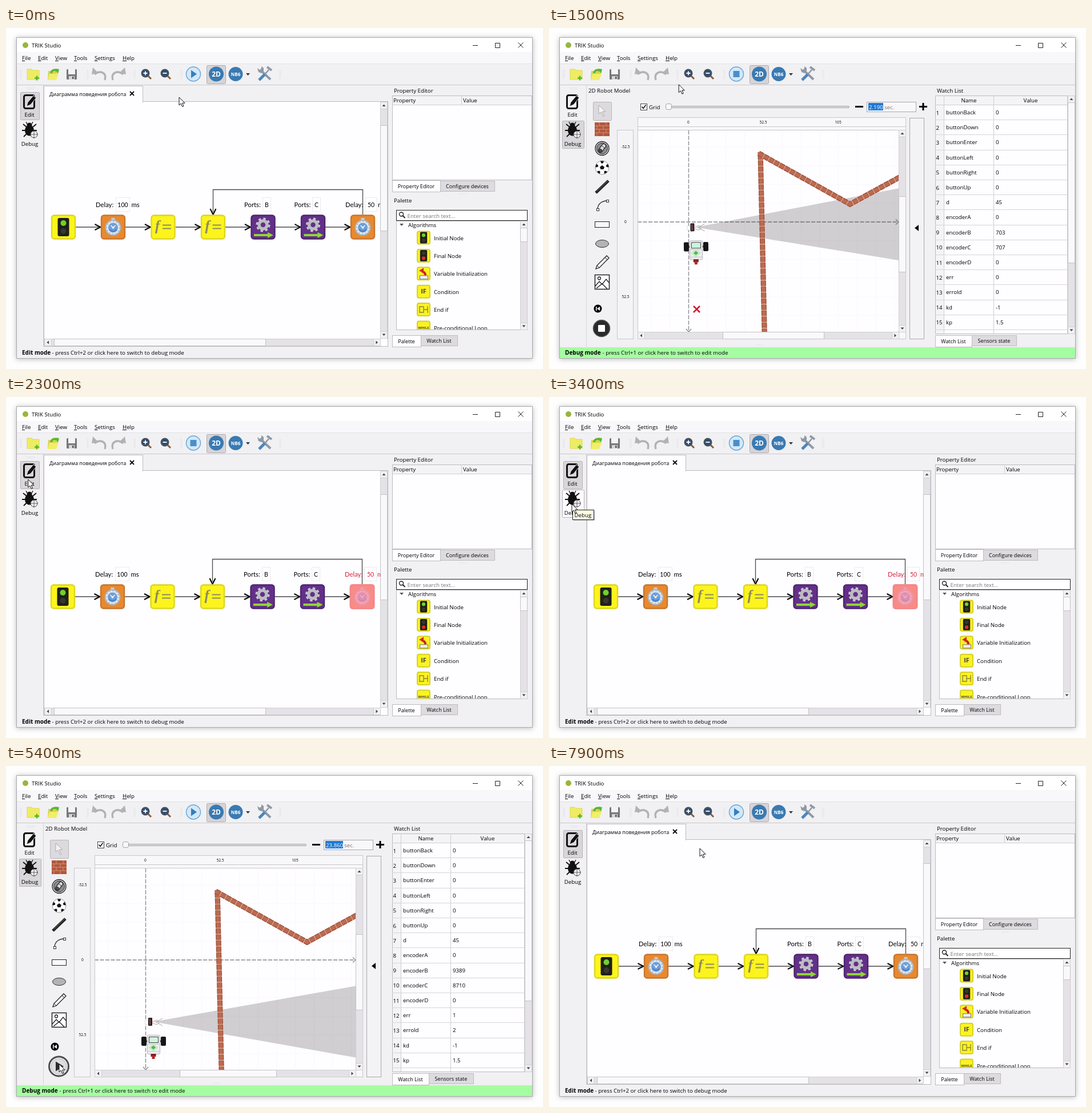
These frames come from a looping animation (940 px wide and 596 px high, 8000 ms). An HTML page:

```html
<!DOCTYPE html>
<html lang="en">
<head>
<meta charset="utf-8">
<title>Robot studio</title>
<style>
html, body { margin: 0; width: 100%; height: 100%; overflow: hidden; background: #fefefe; }
svg { display: block; width: 100%; height: 100%; }
text { font: 9.7px "Open Sans", sans-serif; fill: #000; white-space: pre; }
.b { font-weight: 700; }
.mode { font-size: 10px; }
.mid { text-anchor: middle; }
.tiny { font-size: 6.6px; text-anchor: middle; }
.tab { font-size: 9.1px; }
.lab text { font: 11.3px Lato, sans-serif; }
.lab .num { font-size: 10.5px; }
.fn { font: italic bold 25px "Liberation Serif", serif; fill: #8d8a62; }
.w { fill: #fff; }
.gray { fill: #777; }
.hot text { fill: #d8203c; }
.win { filter: drop-shadow(0 1px 5px #0004); }
</style>
</head>
<body>
<svg id="stage" viewBox="0 0 940 596"></svg>
<script>
const BG = '#f1f0f3', PAPER = '#fefdff', EDGE = '#bdbbc0';
const LOOP = 8000;

// markup helpers
const rect = (x, y, w, h, fill, stroke, more = '') => {
  const o = stroke ? .5 : 0;
  return `<rect x="${x + o}" y="${y + o}" width="${w}" height="${h}" fill="${fill}" stroke="${stroke || 'none'}" ${more}/>`;
};
const text = (x, y, s, cls = '', more = '') => `<text x="${x}" y="${y}" class="${cls}" ${more}>${s}</text>`;
const fill = (d, c, more = '') => `<path d="${d}" fill="${c}" ${more}/>`;
const line = (d, c, w = 1, more = '') => `<path d="${d}" fill="none" stroke="${c}" stroke-width="${w}" ${more}/>`;
const disc = (x, y, r, f, stroke = 'none', w = 1, more = '') =>
  `<circle cx="${x}" cy="${y}" r="${r}" fill="${f}" stroke="${stroke}" stroke-width="${w}" ${more}/>`;
const group = (body, more = '') => `<g ${more}>${body}</g>`;
const at = (x, y, body) => group(body, `transform="translate(${x} ${y})"`);
const clip = (id, x, y, w, h) => `<clipPath id="${id}">${rect(x, y, w, h, '#000')}</clipPath>`;
const range = (n, f) => Array.from({ length: n }, (_, i) => f(i)).join('');

const tri = (x, y, turn) => at(x, y, fill('M-3 1.5L0-2 3 1.5z', '#444', `transform="rotate(${turn})"`));
const vbar = (x, y, h, ty, th) => rect(x, y, 12, h, '#e4e2e6', '#d0ced2') + rect(x, y, 12, 12, BG, '#d0ced2') +
  rect(x, y + h - 12, 12, 12, BG, '#d0ced2') + rect(x, ty, 12, th, '#f9f8fa', '#c4c2c6') +
  tri(x + 6.5, y + 6.5, 0) + tri(x + 6.5, y + h - 6, 180);
const hbar = (x, y, w, tx, tw, id) => rect(x, y, w, 12, '#e4e2e6', '#d0ced2') + rect(x, y, 12, 12, BG, '#d0ced2') +
  rect(x + w - 12, y, 12, 12, BG, '#d0ced2') + rect(tx, y, tw, 12, '#f9f8fa', '#c4c2c6', `id="${id}"`) +
  tri(x + 6.5, y + 6.5, -90) + tri(x + w - 6, y + 6.5, 90);
const tab = (x, y, w, h, s, on) => rect(x, y, w, h, on ? PAPER : '#dddbdf', EDGE) + text(x + w / 2, y + h / 2 + 4, s, 'mid tab');
const dots = (x, y, w, h) => line(w ? `M${x} ${y}h${w}` : `M${x} ${y}v${h}`, '#cfcdd2', 1, 'stroke-dasharray="1 2"');

// window frame, menu and toolbar
function toolbar() {
  const zoom = (x, plus) => line(`M${x + 4} 83l6 6`, '#8a5f3a', 3) + disc(x, 79, 6.5, '#2f5078', '#4b4f55', 2) +
    line(`M${x - 3.5} 79h7` + (plus ? `M${x} 75.5v7` : ''), '#fff', 1.8);
  const undo = line('M173 91c4-13-8-18-18-10', '#b3b1b5', 3.5) + fill('M150 81l2-12 10 10z', '#b3b1b5');
  return [25, 142, 224, 306, 479].map(x => dots(x, 73, 0, 16) + dots(x + 2, 74.5, 0, 14)).join('') +
    fill('M37 72h8l2 2h11v16h-21z', '#eeec62', 'stroke="#dcd85a"') + line('M54 83.5v8M50 87.5h8', '#51b52e', 2.4) +
    fill('M74 75h14l2 2-3 14h-14z', '#d9d24b') + fill('M76 80h16l-4 11h-15z', '#f1ee68') +
    line('M79 79c1-6 6-7 10-4', '#58b534', 3.5) + fill('M86 71l7 1-2 8z', '#58b534') +
    rect(106, 72, 18, 18, '#77777c', '', 'rx="1.5"') + rect(109, 72, 12, 9, '#f4f4f6') + rect(110, 84, 10, 6, '#d4d4d8') +
    rect(116, 85, 2.5, 4, '#555') + undo + group(undo, 'transform="translate(360 0) scale(-1 1)"') +
    zoom(244, true) + zoom(278, false) +
    rect(311, 65, 33, 32, '#dcdade', '#b8b6ba', 'id="runHover" rx="2"') +
    disc(328, 80.5, 12.5, '#d3e8f9', '#62a5d8', 1.4) +
    fill('M324 73.5l10 7-10 7z', '#357fbd', 'id="runIcon"') + rect(322.5, 75, 11, 11, '#4a8fca', '', 'id="haltIcon"') +
    rect(351, 65, 33, 32, '#d6d4d8', '#aeacb0', 'rx="2"') + disc(368, 80.5, 13, '#3a7ab2') +
    text(368, 84.8, '2D', 'b mid w', 'style="font-size:12px"') +
    disc(402, 80.5, 12.5, '#3a7ab2') + text(402, 83.5, 'NB6', 'b mid w', 'style="font-size:8px"') + fill('M420 79h7l-3.5 4z', '#333') +
    line('M446 74l17 16', '#8d99a6', 4) + fill('M440 70l4 3 3-2 0-4 4 3 0 5-4 4-5-2z', '#8d99a6') +
    line('M443 91l10-10', '#4a86bd', 5) + line('M453 81l7-8', '#8d99a6', 2.5) + line('M457 68l8 6', '#8d99a6', 4);
}
function frame() {
  const menu = [['File', 28], ['Edit', 56], ['View', 86], ['Tools', 119], ['Settings', 155], ['Help', 204]];
  const bug = line('M30 168l6 5M53 168l-6 5M28 179h26M31 190l5-5M52 190l-5-5', '#111', 1.8) +
    `<ellipse cx="41" cy="179" rx="8" ry="9.5" fill="#111"/>` + disc(41, 170, 4.5, '#111') + line('M37 168l-2-4M45 168l2-4', '#111', 1.3) +
    disc(49, 186, 6, '#efeef1', '#444') + line('M42 186h14M49 179v14', '#444', .8);
  return rect(18, 16, 903, 561, BG, '#a9a7ac', 'class="win"') + rect(19, 17, 902, 25, '#fff') + rect(19, 42, 902, 20, '#f8f7fa') +
    disc(34, 30, 5, '#98b63c') + text(45, 34, 'TRIK Studio') +
    line('M817 30.5h9M856.5 26.5h8v8h-8zM896.5 25.5l9 9m0-9l-9 9', '#222') +
    menu.map(([s, x]) => text(x, 56, `<tspan text-decoration="underline">${s[0]}</tspan>${s.slice(1)}`)).join('') +
    line('M19 62.5h902', '#e3e1e5') + line('M19 99.5h902', '#c9c7cc') + toolbar() +
    line('M65.5 100v457', '#d5d3d8') + dots(37, 104.5, 14) + dots(38, 107, 12) +
    rect(25, 112, 33, 48, '#d8d6da', '#b5b3b8', 'id="editBox" rx="1"') + rect(23, 162, 38, 48, '#d8d6da', '#b5b3b8', 'id="debugBox" rx="1"') +
    rect(31, 117, 18, 23, 'none', '#111', 'rx="3" stroke-width="3"') +
    fill('M36 137l2-7 10-12 5 4-10 12z', '#111', 'stroke="#efeef1"') + text(41, 155, 'Edit', 'mid') + bug + text(41.5, 206, 'Debug', 'mid') +
    rect(19, 558, 902, 19, BG, '', 'id="bar"') + text(28, 571, '', 'b mode', 'id="modeName"') + text(80, 571, '', '', 'id="modeHint"');
}

// block diagram
const tile = (c, edge) => rect(-20.5, -20.5, 41, 41, c, '', `rx="4.5" style="stroke:${edge};stroke-width:2.4"`);
const clock = tile('#e8892f', '#c6762f') + rect(-3, -16, 6, 4, '#c5ced8') + disc(0, 1, 13, '#dfe6ee', '#a9b4c2', 2) +
  disc(0, 1, 11, 'none', '#7d8ba0', 1.6, 'stroke-dasharray="1 4.76"') + disc(0, 1, 8.5, '#6f9fd8') +
  line('M-6 4a7 7 0 0 0 12 0', '#4f86cc', 3) + line('M-4-3L0 1l4-4', '#f2f6fb', 1.6) + disc(0, 1, 1.8, '#f2f6fb');
const func = tile('#fcf41c', '#dcd61f') + text(-14, 6, 'f', 'fn') + line('M-1-3.5h15M-1 2.5h15', '#8d8a62', 2);
const motor = tile('#633089', '#4e2670') + disc(0, -4, 10.5, 'none', '#c9c9cf', 4, 'stroke-dasharray="4.2 4.047"') +
  disc(0, -4, 7, '#633089', '#bcbcc3', 5.5) + line('M-16 14h25', '#8fd634', 4) + fill('M8 9l10 5-10 5z', '#8fd634');
const lamp = (dot, y) => rect(-10, -16, 20, 32, '#20201b', '', 'rx="3"') + disc(0, -7, 5, '#37372d') + disc(0, 7, 5, '#37372d') + disc(0, y, 5, dot);
const start = tile('#fcf41c', '#dcd61f') + lamp('#6fd12c', -7);

function diagram() {
  const xs = [100.5, 187.5, 275, 362.5, 450, 537.5, 624.5], icons = [start, clock, func, func, motor, motor, clock];
  const box = (x, w, s) => rect(x, 296, w, 24, '#fff', '#d6d4d9', 'stroke-dasharray="1 1"') + text(x + w / 2 + .5, 313, s, 'num mid');
  const link = xs.slice(1).map(x => line(`M${x - 66} 348H${x - 22}`, '#4a4a4a', 1.3) + line(`M${x - 32} 343l10 5-10 5`, '#000', 2)).join('');
  const hot = group(text(594, 313, 'Delay:') + box(628, 21, '50') + text(651, 313, 'ms'), 'id="lastLabel"');
  return group(group(
    line('M624.5 326V282.5H362.5V322', '#4a4a4a', 1.3) + line('M357.5 316l5 10 5-10', '#000', 2) + link +
    xs.map((x, i) => at(x, 348, icons[i])).join('') + rect(602.5, 326, 44, 44, '#ff8ca4', '', 'id="hotTile" rx="4.5" opacity=".75"') +
    group(text(157, 313, 'Delay:') + box(192, 24, '100') + text(219.5, 313, 'ms') + text(417, 313, 'Ports:') + box(449, 14, 'B') +
      text(504.5, 313, 'Ports:') + box(536, 14, 'C') + hot, 'class="lab"'), 'id="diagram"'), 'clip-path="url(#sheet)"');
}
function palette() {
  const arrow = rect(-7, 3, 14, 6, '#eee', '#777') + line('M3 3c0-5-3-6-6-7', '#c22', 4) + fill('M-8-5l8-5 0 9z', '#d02828');
  const small = s => group(s, 'transform="scale(.62)"');
  const word = (s, z) => text(0, z / 3, s, 'b mid', `style="font-size:${z}px;fill:#444"`);
  const merge = line('M-7-6v12M-7-5h7v10h-7M0 0h7M7-6v12', '#99933a', 1.6);
  const rows = [['Initial Node', small(lamp('#6fd12c', -7))], ['Final Node', small(lamp('#e02a2a', 7))], ['Variable Initialization', arrow],
    ['Condition', word('IF', 11)], ['End if', merge], ['Pre-conditional Loop', word('WHILE', 6)]];
  return group(rows.map(([s, icon], i) => at(731, 366.5 + i * 31.4,
    rect(-11, -11, 22, 22, '#fbf320', '', 'rx="3" style="stroke:#d6d02a;stroke-width:2"') + icon + text(18, 4, s))).join(''), 'clip-path="url(#tree)"');
}
function editView() {
  return rect(66, 128, 602, 428, PAPER, EDGE) + rect(66, 101, 173, 28, PAPER, EDGE) + rect(67, 127, 172, 4, PAPER) +
    text(76, 118.5, 'Диаграмма поведения робота', 'tab') + line('M217 111l7 7m0-7l-7 7', '#111', 2) +
    diagram() + vbar(655, 129, 413, 170, 184) + hbar(67, 543, 588, 84, 370, 'sheetThumb') +
    text(679, 113, 'Property Editor') + rect(676, 118, 244, 147, PAPER, EDGE) + rect(677, 119, 243, 15, '#f4f3f6') + line('M676 134.5h244M797.5 118v16', '#cfcdd2') +
    text(678, 130, 'Property') + text(800, 130, 'Value') +
    tab(760, 267, 95, 18, 'Configure devices') + tab(676, 266, 84, 20, 'Property Editor', true) + dots(792, 290, 14) + text(679, 305, 'Palette') +
    rect(683, 318, 229, 18, '#fff', '#222') + disc(692, 325.5, 3.5, 'none', '#222', 1.4) + line('M694.5 328l4 4', '#222', 2) + text(702.5, 331.5, 'Enter search text...', 'gray') +
    rect(683, 337, 229, 190, PAPER, EDGE) + fill('M689 342h7l-3.5 4z', '#555') + text(704, 348, 'Algorithms') + palette() + vbar(900, 337, 190, 349, 24) +
    tab(726, 537, 64, 18, 'Watch List') + tab(676, 537, 50, 20, 'Palette', true);
}

// 2D model
const names = ['buttonBack', 'buttonDown', 'buttonEnter', 'buttonLeft', 'buttonRight', 'buttonUp', 'd', 'encoderA', 'encoderB',
  'encoderC', 'encoderD', 'err', 'errold', 'kd', 'kp'];
const rowY = i => 147.5 + 26.2 * i;

function watch() {
  return text(679, 113, 'Watch List') + rect(676, 118, 244, 416, PAPER, EDGE) + rect(677, 119, 231, 15, '#f4f3f6') +
    rect(677, 134, 14, 400, '#f4f3f6') + rect(692, 135, 86, 25, '#f0f6fd', '#cfe0f3', 'id="picked"') +
    line('M676 134.5h232M691.5 118v416M778.5 118v416M907.5 118v416', '#cfcdd2') +
    text(735, 130, 'Name', 'mid') + text(843, 130, 'Value', 'mid') +
    names.map((n, i) => line(`M676 ${Math.round(rowY(i) + 12.6) + .5}h231`, '#d6d4d9') + text(677.5, rowY(i) + 4, i + 1) +
      text(695, rowY(i) + 3.5, n) + text(782, rowY(i) + 3.5, '0', '', `id="v${i}"`)).join('') + vbar(908, 118, 416, 130, 280) +
    tab(740, 537, 78, 18, 'Sensors state') + tab(676, 537, 64, 20, 'Watch List', true);
}
const tools = () =>
  rect(77, 129, 32, 32, '#dcdade', '#b8b6ba', 'rx="1"') + fill('M87 135v15l4-3 4 8 2-1-4-8h6z', '#f4f3f6', 'stroke="#aaa"') +
  rect(80, 165, 26, 24, '#b2573c') + line('M80 171h26M80 177h26M80 183h26M88 165v6M100 165v6M84 171v6M95 171v6M88 177v6M100 177v6M84 183v6M95 183v6', '#d69a80', .9) +
  disc(93, 210.5, 12, '#d8d8dc', '#222', 1.3) + disc(93, 210.5, 9.5, '#8c8c92', '#222') + line('M90 214l6-8', '#222', 8, 'stroke-linecap="round"') +
  line('M90 214l6-8', '#ddd', 5.5, 'stroke-linecap="round"') + disc(90, 214, 2.5, '#555', '#222') + line('M93 206l4 4', '#222') +
  disc(93, 244, 12, '#fff', '#999') + range(5, i => group(fill('M90 232.5h6l-1 3-2 1.5-2-1.5z', '#111'), `transform="rotate(${i * 72} 93 244)"`)) + fill('M93 240l4 3-1.500 4h-5l-1.500-4z', '#111') +
  line('M82 288l22-21', '#222', 5) + line('M84 285l19-18', '#6b7a60') +
  line('M85 317c0-10 8-15 17-15', '#333', 1.4) + rect(83, 315, 4, 4, '#fff', '#333') + rect(100, 300, 4, 4, '#fff', '#333') +
  rect(80, 338, 25, 10, '#f8f7fa', '#222') + `<ellipse cx="93" cy="377" rx="11.5" ry="6.5" fill="#b4b2b6" stroke="#333"/>` +
  fill('M82 421l2-6 17-17 4 4-17 17z', '#f3f2f5', 'stroke="#222" stroke-width="1.3"') + line('M84 415l4 4M98 401l4 4', '#222') +
  rect(80, 431, 25, 25, '#fff', '#222', 'stroke-width="1.5"') + line('M81 451l7-8 5 5 7-9 5 6M83 455l10-8 9 9', '#222', 1.4) + disc(88, 437.5, 2.5, '#fff', '#222', 1.3) +
  disc(85.5, 490.5, 7, '#000') + fill('M89 487v7l-5-3.5zM82 487h1.5v7h-1.5z', '#fff') +
  group(disc(92, 525, 14.5, '#2a2a2c', '#555', 1.5) + rect(86, 519, 12, 12, '#fff', '', 'rx="1"'), 'id="stopBtn"') +
  group(disc(92.5, 525, 17, '#f1f1f3', '#4c4c50', 3) + disc(92.5, 525, 13.5, '#dddde0', '#b9b9be') + fill('M87 516.5l14 8.5-14 8.5z', '#2c2c30'), 'id="goBtn"');

const brick = d => line(d, '#dfb09c', 9) + line(d, '#8f4632', 9, 'stroke-dasharray="9 1.5"') + line(d, '#bd6a50', 7, 'stroke-dasharray="8.5 2"');
const ray = group(fill('M0-44L640-157V69z', '#1a101c', 'opacity=".2"'), 'id="rayPose"');
const robot = group(
  rect(-15, -47, 5, 7, '#fff', '#ddd') + rect(-9, -51, 7, 14, '#2a2428', '', 'rx="1"') + rect(-7, -49, 2, 10, '#944') +
  line('M-2-44l8-3 4 3M-2-42l8 3 4-3M4-43l12-7M4-44l12 7', '#aaa', 1) +
  line('M-14-10h28', '#555', 3) + rect(-21, -18, 9, 16, '#161616', '', 'rx="2"') + rect(13, -18, 9, 16, '#161616', '', 'rx="2"') +
  rect(-11, -21, 22, 33, '#eeedf0', '#b6b4b9', 'rx="2"') + rect(-8, -18, 16, 10, '#cdf5dc', '#444') + line('M-10-5h21M-10 8h21', '#c4c2c8') +
  fill('M0-6l9 7-9 7-9-7z', '#c5ebc4') + fill('M0-2.500l4 3.500-4 3.500-4-3.500z', '#4fb552') +
  rect(-4.5, 12, 9, 5, '#7a1f22') + rect(-2.5, 15, 5, 6, '#b3262b'), 'id="pose"');

function debugView() {
  const grid = range(15, i => `M${179 + i * 32.75} 179v352`) + range(11, i => `M155 ${208 + i * 32.75}h457`);
  return text(69, 113, '2D Robot Model') + tools() +
    rect(160, 132, 11, 11, '#fff', '#444') + line('M162.5 137.5l2.5 3 4.5-6', '#111', 1.6) + text(175, 141.5, 'Grid') +
    rect(204, 136, 321, 3, '#d9d7db', '#aaa8ad', 'rx="1.5"') + rect(204, 132, 10, 10, '#f8f7fa', '#9f9da2', 'rx="3"') +
    line('M536 137.5h14M648 137.5h14M655 131v13', '#000', 3) + rect(556, 129, 86, 17, '#f8f7fa', '#aaa8ad') +
    rect(559, 131, 26, 13, '#1e78d0', '', 'id="selBox"') + text(560, 141.5, '', 'w', 'id="clock"') + text(587, 141.5, 'sec.', 'gray', 'id="unit"') +
    rect(155, 156, 469, 387, '#f8f7fa', '#c9c7cc') + rect(119, 178, 28, 365, '#f4f3f6', '#c9c7cc') + line('M155 172.5h469', '#c9c7cc') +
    [['0', 244], ['52.5', 375], ['105', 506]].map(([s, x]) => text(x, 166.5, s, 'tiny')).join('') +
    [['-52.5', 207], ['0', 338], ['52.5', 469]].map(([s, y]) => text(134, y + 2.5, s, 'tiny')).join('') +
    rect(155, 178, 457, 353, PAPER, '#c9c7cc') +
    group(line(grid, '#f9f7fb') + line('M244.5 179v352M155 339h457', '#88868b', 1.3, 'stroke-dasharray="7 2.5"') +
      line('M240 526l4.5 5 4.5-5M607 334.5l5 4.5-5 4.5', '#88868b', 1.3) + ray +
      brick('M377.5 545L370 217') + brick('M367 219L527 308L650 241') + line('M253 486l11 11m0-11l-11 11', '#d4142a', 2.6) + robot, 'clip-path="url(#field)"') +
    vbar(612, 178, 353, 294, 132) + hbar(155, 531, 457, 304, 177, 'fieldThumb') +
    rect(631, 157, 25, 386, '#f3f2f5', '#aaa8ad') + fill('M647 344v11l-7-5.5z', '#000') + dots(362, 554, 14) + watch();
}

stage.innerHTML = `<defs>${clip('sheet', 67, 129, 588, 413)}${clip('tree', 684, 338, 216, 189)}${clip('field', 156, 179, 456, 352)}</defs>` +
  frame() + group(editView(), 'id="editView"') + group(debugView(), 'id="debugView"') +
  group(rect(43, 199, 37, 17, '#0003') + rect(41, 197, 37, 17, '#ffffe6', '#222') + text(44.5, 209.5, 'Debug'), 'id="tip"') +
  fill('M0 0v14l3.3-3 2.4 5.5 2.3-1-2.4-5.3h4.5z', '#fff', 'stroke="#111" id="mouse"');

// timing: the picture advances in 100 ms steps, except for these holds
const holds = [[100, 600], [600, 1100], [1100, 1300], [2400, 2900], [2900, 3400], [3400, 3900], [5400, 5700], [5700, 6000], [6000, 6300], [6900, 7400]];
const mousePath = [[0, 303, 121], [100, 312, 115], [600, 333, 98], [1100, 328, 80], [1300, 328, 80], [1800, 76, 127], [2100, 40, 142], [2400, 38, 145],
  [2900, 40, 187], [3900, 40, 187], [4700, 94, 501], [5100, 93, 521], [6000, 93, 521], [6300, 88, 470], [6900, 35, 145], [7400, 35, 145], [7900, 264, 144]];
const simPath = [[1300, .41], [1800, 4.86], [2400, 10.2], [2900, 11.09], [3400, 11.98], [3900, 12.88], [4700, 20.01], [5100, 23.57], [5200, 23.86]];
const robotPath = [[0, 258, 491, 0], [4.86, 256, 272, -1.8], [8, 252, 128, 0], [10.5, 300, 50, 50], [12.9, 400, 75, 105], [15, 480, 130, 110],
  [17, 570, 150, 85], [18.5, 640, 170, 100], [20.01, 710, 217.6, 112.4], [23.6, 840, 300, 150]];
const encoders = [[0, 0, 0], [4.86, 1560, 1568], [20.01, 7580, 7072], [23.86, 9389, 8710]];

function along(keys, t) {
  const i = keys.findIndex(k => k[0] > t);
  if (i < 0) return keys.at(-1).slice(1);
  if (!i) return keys[0].slice(1);
  const a = keys[i - 1], b = keys[i], u = (t - a[0]) / (b[0] - a[0]);
  return a.slice(1).map((v, n) => v + (b[n + 1] - v) * u);
}
const $ = id => document.getElementById(id);
const show = (id, on) => { $(id).style.display = on ? '' : 'none'; };
const within = (x, y, l, t, r, b) => x >= l && x < r && y >= t && y < b;

function draw(ms) {
  const hold = holds.find(([a, b]) => ms >= a && ms < b);
  const t = hold ? hold[0] : Math.floor(ms / 100) * 100;
  const debug = t >= 1300 && t < 2200 || t >= 3900 && t < 7400;
  const running = t >= 1300 && t < 5200;
  const [mx, my] = along(mousePath, t);
  $('mouse').setAttribute('transform', `translate(${mx} ${my})`);

  show('editView', !debug);
  show('debugView', debug);
  show('runIcon', !running);
  show('haltIcon', running);
  show('runHover', within(mx, my, 311, 65, 345, 97));
  show('tip', t === 3400);
  const overEdit = within(mx, my, 25, 112, 59, 161), overDebug = within(mx, my, 23, 162, 62, 211);
  show('editBox', !debug || overEdit);
  show('debugBox', debug || overDebug);
  $('editBox').setAttribute('fill', debug ? '#fdfcfe' : '#d8d6da');
  $('debugBox').setAttribute('fill', debug ? '#d8d6da' : '#fdfcfe');
  $('bar').setAttribute('fill', debug ? '#a5fda1' : BG);
  $('modeName').textContent = debug ? 'Debug mode' : 'Edit mode';
  $('modeHint').textContent = debug ? '- press Ctrl+1 or click here to switch to edit mode' : '- press Ctrl+2 or click here to switch to debug mode';
  $('modeHint').setAttribute('x', debug ? 93.5 : 80.5);

  const shift = t < 1300 ? '0 0' : t < 3900 ? '-1 1' : '0 2';
  $('diagram').setAttribute('transform', `translate(${shift})`);
  show('hotTile', running);
  $('lastLabel').setAttribute('class', running ? 'hot' : '');

  const [sim] = along(simPath, t);
  const [x, y, turn] = along(robotPath, running ? sim : 0);
  const pose = `translate(${x} ${y}) rotate(${turn})`;
  $('pose').setAttribute('transform', pose);
  $('rayPose').setAttribute('transform', pose);
  $('clock').textContent = sim.toFixed(2) + '0';
  const wide = sim >= 10;
  $('selBox').setAttribute('width', wide ? 31 : 26);
  $('unit').setAttribute('x', wide ? 592 : 587);
  show('stopBtn', running);
  show('goBtn', !running);
  show('picked', t >= 3900 && running);
  $('fieldThumb').setAttribute('width', running ? 177 : 169);

  const [b, c] = along(encoders, sim).map(Math.round);
  const err = !running ? [1, 2] : sim < 7 ? [0, 0] : [-6, -6];
  [0, 0, 0, 0, 0, 0, 45, 0, b, c, 0, ...err, -1, 1.5].forEach((v, i) => { $('v' + i).textContent = v; });
}

const t0 = performance.now();
function tick() {
  draw((performance.now() - t0) % LOOP);
  requestAnimationFrame(tick);
}
tick();
</script>
</body>
</html>
```
